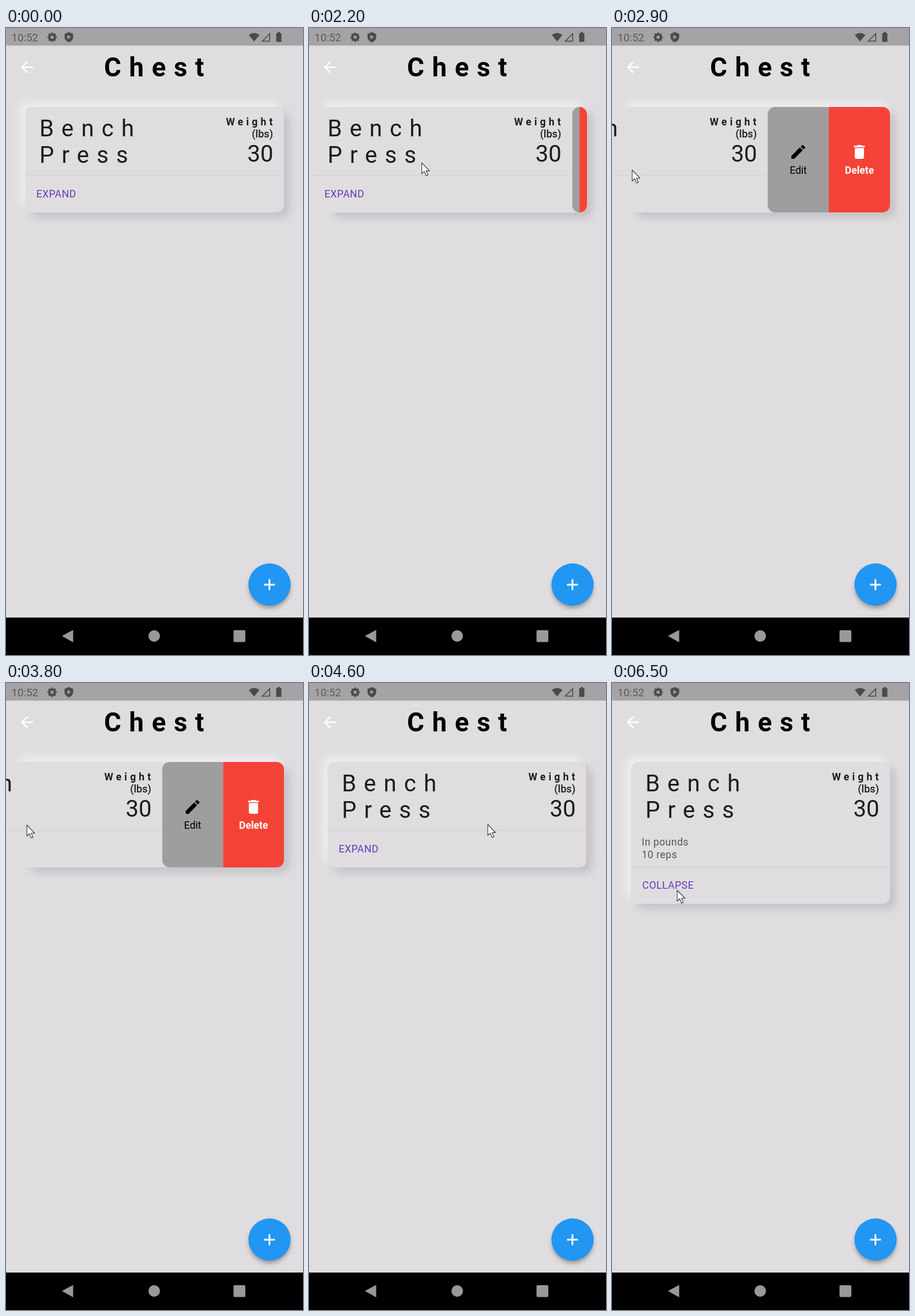
Recreate the animation shown at these times as an HTML page. Size 515 px wide and 1088 px high, loop 8 s.

```html
<!DOCTYPE html>
<html lang="en">
<head>
<meta charset="utf-8">
<title>Workout card</title>
<style>
  html, body { margin: 0; width: 100%; height: 100%; overflow: hidden; background: #dfdde0; }
  svg { display: block; width: 515px; height: 1088px; }
  text { font-family: Roboto, sans-serif; font-size: 17.5px; fill: #1d1c1d; white-space: pre; }
  .clock { font-size: 18.6px; fill: #5c5a5d; }
  .title { font-size: 45.5px; font-weight: 700; letter-spacing: 13.7px; fill: #000; }
  .big { font-size: 40px; letter-spacing: 13.2px; }
  .weight { font-weight: 700; letter-spacing: 5.2px; }
  .unit { font-size: 18px; font-weight: 500; text-anchor: end; }
  .count { font-size: 40px; text-anchor: end; }
  .note { letter-spacing: .5px; fill: #575658; }
  .toggle { letter-spacing: .5px; fill: #673ab7; }
  .label { text-anchor: middle; }
</style>
</head>
<body>
<svg viewBox="0 0 515 1088">
  <defs>
    <filter id="soft" x="-20%" y="-40%" width="140%" height="180%"><feGaussianBlur stdDeviation="7.5"/></filter>
    <filter id="drop" x="-40%" y="-40%" width="180%" height="180%"><feGaussianBlur stdDeviation="4.5"/></filter>
    <clipPath id="actionClip"><rect id="actionBox" y="137" height="183" rx="13"/></clipPath>
    <clipPath id="bodyClip"><rect id="bodyBox" x="33" y="137" width="449"/></clipPath>
    <clipPath id="footClip"><rect id="footBox" x="33" width="449" height="63"/></clipPath>
  </defs>
  <rect width="515" height="1088" fill="#dfdde0"/>

  <g fill="#4b494c" stroke="#4b494c" stroke-width="0">
    <rect width="515" height="30.5" fill="#a6a3a7"/>
    <text class="clock" x="9.5" y="22.5">10:52</text>
    <circle cx="80" cy="16" r="4.8" fill="none" stroke-width="4"/>
    <circle cx="80" cy="16" r="7" fill="none" stroke-width="2.6" pathLength="16" stroke-dasharray="1" stroke-dashoffset=".5"/>
    <path d="M109 7l7.5 3.2v5.3c0 4.4-3 7.8-7.5 9.3c-4.5-1.5-7.5-4.9-7.5-9.3v-5.3z"/>
    <path d="M106.500 12l6 3.700l-6 3.700z" fill="#a6a3a7"/>
    <path d="M421 12Q430 5 439.5 12L430.2 23.5Z"/>
    <path d="M457.3 10V22.7H444.5Z" fill="none" stroke-width="1.6"/>
    <path d="M468.5 9h2.5V7h4v2h2.5V24h-9z"/>
  </g>

  <path d="M47 68H28M37 58.5L27.5 68L37 77.5" fill="none" stroke="#fff" stroke-width="2.6"/>
  <text class="title" x="170" y="84">Chest</text>

  <rect id="dark" x="42" y="146" width="449" rx="13" fill="#c2c0c4" filter="url(#soft)"/>
  <rect id="light" x="24" y="128" width="449" rx="13" fill="#efedf0" filter="url(#soft)"/>
  <rect id="base" x="33" y="137" width="449" rx="13" fill="#dfdde0"/>

  <g id="actions" clip-path="url(#actionClip)">
    <rect id="grey" y="137" height="183" fill="#9e9e9e"/>
    <rect id="red" y="137" height="183" fill="#f44336"/>
    <g id="edit">
      <path transform="translate(-16 199) scale(1.33)" d="M3 17.25V21h3.75L17.81 9.94l-3.75-3.75zM20.71 7.04a1 1 0 0 0 0-1.41l-2.34-2.34a1 1 0 0 0-1.41 0l-1.83 1.83 3.75 3.75z"/>
      <text id="editText" class="label" y="253" style="fill:#000"></text>
    </g>
    <g id="del">
      <path transform="translate(-16 199) scale(1.33)" fill="#fff" d="M6 19c0 1.1.9 2 2 2h8c1.1 0 2-.9 2-2V7H6zM19 4h-3.5l-1-1h-5l-1 1H5v2h14z"/>
      <text id="delText" class="label" y="253" style="fill:#fff;font-weight:700"></text>
    </g>
  </g>

  <g id="card">
    <rect id="face" x="33" y="137" width="449" rx="13" fill="#dfdde0"/>
    <g id="head">
      <text class="big" x="58" y="187.5">Bench</text>
      <text class="big" x="58" y="233.5">Press</text>
      <text class="weight" x="381.5" y="169">Weight</text>
      <text class="unit" x="463" y="190">(lbs)</text>
      <text class="count" x="463.5" y="232">30</text>
    </g>
    <g id="notes" clip-path="url(#bodyClip)">
      <text class="note" x="51.5" y="282">In pounds</text>
      <text class="note" x="51.5" y="303.5">10 reps</text>
    </g>
    <rect id="rule" x="33" width="449" height="1.2" fill="#d4d2d5"/>
    <g clip-path="url(#footClip)"><circle id="ripple" cx="103" fill="#c5d5e2"/></g>
    <text id="toggle" class="toggle" x="52.6"></text>
  </g>

  <circle cx="457" cy="971" r="35" fill="#000" opacity=".38" filter="url(#drop)"/>
  <circle cx="457" cy="965.7" r="36.6" fill="#2196f3"/>
  <path d="M447.3 966h19M456.800 956.500v19" stroke="#fff" stroke-width="3"/>

  <rect y="1023" width="515" height="65"/>
  <g fill="#999">
    <path d="M97 1055L116.5 1044.5V1066Z"/>
    <circle cx="257" cy="1055" r="10"/>
    <rect x="394.5" y="1045" width="20.5" height="20.5" rx="2"/>
  </g>

  <path id="cursor" d="M0 0V19L4.4 15L7.6 22.5L10.7 21.2L7.5 14H13.5Z" fill="#fff" stroke="#333" stroke-width="1.1" stroke-linejoin="round"/>
</svg>
<script>
const LOOP = 8000, STEP = 100, RIGHT = 482, TOUCH = 2200;

// Pointer strokes: start and end time, then the distance covered
const strokes = [
  [2012, 2876, -218, 3],
  [2650, 2900, 31, 10],
  [3775, 4425, 275, -1],
  [4600, 5300, -191, 44],
  [5900, 6500, -6, 70]
];

const $ = id => document.getElementById(id);
const set = (id, attrs) => {
  for (const k in attrs) $(id).setAttribute(k, attrs[k]);
};
const ramp = (t, a, b) => Math.min(1, Math.max(0, (t - a) / (b - a)));
const ease = (t, a, b) => {
  const p = ramp(t, a, b);
  return p * p * (3 - 2 * p);
};

// Swipe open, swipe back to the last pixel, then snap shut
function swipe(t) {
  if (t < TOUCH) return 0;
  return 212 * ease(t, 2012, 2876) - 211 * ease(t, 3775, 4425) - ease(t, 4600, 4700);
}

function pointer(t) {
  let x = 222, y = 233.5;
  for (const [a, b, dx, dy] of strokes) {
    x += dx * ease(t, a, b);
    y += dy * ease(t, a, b);
  }
  return `translate(${x} ${y})`;
}

// Shortens a label to the room its button leaves
function fit(word, room) {
  if (word.length * 9 <= room) return word;
  const kept = Math.floor((room - 15) / 9);
  return kept < 0 ? "" : word.slice(0, kept) + "…";
}

function drawActions(off) {
  const half = off / 2, left = RIGHT - off, room = half - 40;
  const icons = room > 0 ? "inline" : "none";
  set("actions", { display: off > 0 ? "inline" : "none", opacity: ramp(off, 0, 2) });
  set("actionBox", { x: left, width: off });
  set("grey", { x: left, width: half });
  set("red", { x: left + half, width: half });
  set("edit", { transform: `translate(${left + half / 2})`, display: icons });
  set("del", { transform: `translate(${RIGHT - half / 2})`, display: icons });
  $("editText").textContent = fit("Edit", room);
  $("delText").textContent = fit("Delete", room);
}

function drawCard(t, off) {
  const open = ease(t, 5530, 5890), extra = 63 * open, rule = 256 + extra;
  const press = ramp(t, 5500, 5900);
  for (const id of ["dark", "light", "base", "face"]) set(id, { height: 183 + extra });
  set("card", { transform: `translate(${-off})` });
  set("head", { opacity: 1 - .2 * Math.sin(Math.PI * press) });
  set("notes", { opacity: open });
  set("bodyBox", { height: rule - 137 });
  set("rule", { y: rule - .6 });
  set("footBox", { y: rule });
  set("ripple", { cy: 288 + extra, r: 85 * ramp(t, 5500, 5800), opacity: 1 - ramp(t, 5700, 6000) });
  set("toggle", { y: 294 + extra });
  $("toggle").textContent = open > 0 ? "COLLAPSE" : "EXPAND";
}

function draw(now) {
  const t = Math.floor(now % LOOP / STEP) * STEP, off = swipe(t);
  drawActions(off);
  drawCard(t, off);
  set("cursor", { transform: pointer(t), display: t < TOUCH ? "none" : "inline" });
}

const start = performance.now();
function tick() {
  draw(performance.now() - start);
  requestAnimationFrame(tick);
}
tick();
</script>
</body>
</html>
```
